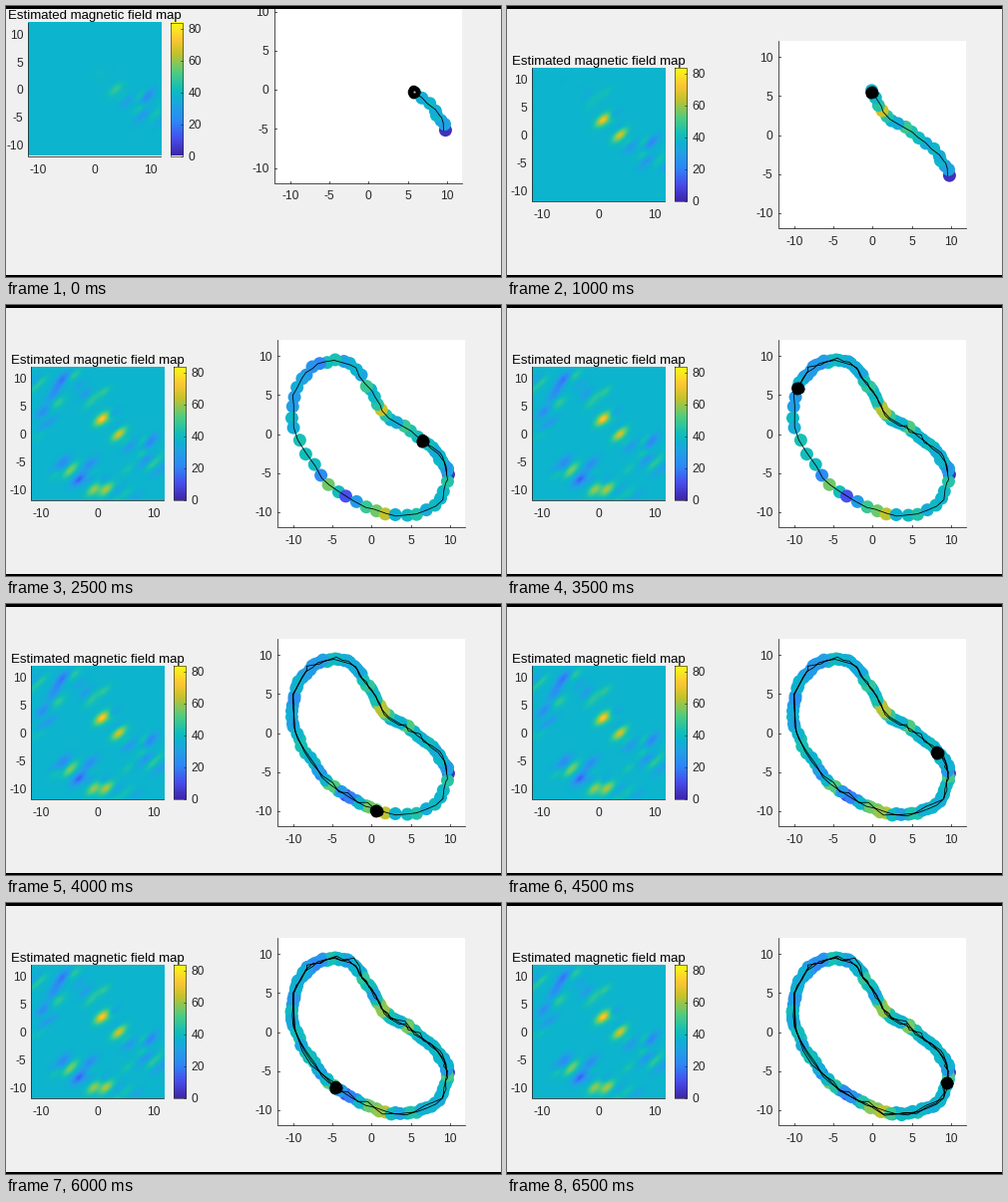
A matplotlib script for the animation above (9000 ms loop, 496x272 px).

```python
import numpy as np
import matplotlib.pyplot as plt
from matplotlib.animation import FuncAnimation
from matplotlib.colors import LinearSegmentedColormap
from matplotlib.patches import Rectangle

W, H, DPI = 496, 272, 100
PX = 72 / DPI
INK = "#262626"
VMAX, BASE = 83.75, 37.5
LAST = 12
rng = np.random.default_rng(4)
plt.rcParams["font.family"] = "Liberation Sans"

parula = LinearSegmentedColormap.from_list("parula", [
    (0, "#3e26a8"), (.125, "#484dec"), (.25, "#2e87f7"), (.375, "#1fa3e2"),
    (.44, "#0db3d0"), (.5, "#12beb9"), (.625, "#4fcc80"), (.77, "#c7c22b"),
    (.875, "#fec733"), (1, "#f9fb14")])

# Key points of one lap, in metres, with DOTS measurements between neighbours
KEYS = np.array([
    (9.7, -5.2), (8.4, -2.6), (5, .4), (1.8, 2.4), (-.1, 5.5), (-2.7, 8.9),
    (-6.7, 9), (-9.5, 6), (-9.9, .7), (-6.3, -5.4), (-2, -8.6),
    (3, -10.5), (8.1, -9.1)])
DOTS = 4
LAP = DOTS * len(KEYS)

# Strongest field blobs: x, y, height
PEAKS = [
    (-.5, 6.4, 11), (.7, 2.7, 33), (3.8, -.1, 29), (5.8, -2, -15),
    (9.5, -1.2, -15), (8.6, -5.3, -14), (10.6, -4.3, 11), (-6.3, 9.9, -20),
    (-8, 7, -11), (-9.9, 4, -13), (-7.2, 5.6, 10), (-6.1, -5.6, -12),
    (-4.8, -6.3, 16), (-3.4, -8.3, -23), (-1.4, -5.5, -13),
    (-.7, -10.1, 22), (1.5, -10.1, 24)]


def reach(step):
    """Measurements made by a given update; the pace varies along the lap."""
    return np.interp(step, [0, 1, 4, 6, 8, 10, 12],
                     [7.1, 16, 58.3, 80.1, 108.2, 128.7, 154.7])


def track(p):
    """Closed Catmull-Rom curve through the key points."""
    u = np.atleast_1d(p) / DOTS
    k, t = np.floor(u).astype(int), (u % 1)[:, None]
    a, b, c, d = (KEYS[(k + i) % len(KEYS)] for i in (-1, 0, 1, 2))
    return b + t / 2 * (c - a + t * (2 * a - 5 * b + 4 * c - d
                                     + t * (3 * (b - c) + d - a)))


def to_px(pts):
    return np.array([366.3, 129.5]) + pts * [7.85, -7.85]


def blob(x, y, height, long=1.6, short=.8, tilt=42):
    c, s = np.cos(np.radians(tilt)), np.sin(np.radians(tilt))

    def at(px, py):
        u = (px - x) * c + (py - y) * s
        v = (py - y) * c - (px - x) * s
        return height * np.exp(-(u / long) ** 2 - (v / short) ** 2)
    return at


# Weak ripples of alternating sign follow the track
ripples = [(*(xy + rng.normal(0, 1.6, 2)), (-1) ** i * rng.uniform(3, 9))
           for i, xy in enumerate(track(np.arange(0, LAP, 1.2)))]
spots = PEAKS + ripples
blobs = [blob(*s) for s in PEAKS] + [blob(*s, 1.4, .6) for s in ripples]
gx, gy = np.meshgrid(np.linspace(-12, 12, 134), np.linspace(12, -12, 134))
layers = np.array([b(gx, gy) for b in blobs])
lap = track(np.arange(LAP))
born = np.array([np.argmin(np.hypot(*(lap - s[:2]).T)) for s in spots])


def field(step):
    """Each blob fades in as the walker passes it."""
    gain = 1 / (1 + np.exp((born - reach(step) - 1) / 1.5))
    return BASE + np.tensordot(gain, layers, 1)


# Dots take the field strength where they lie; the first has no reading yet
dot_at = np.concatenate([np.arange(LAP), np.arange(LAP + .5, reach(LAST))])
dot_xy = track(dot_at) + rng.normal(0, .1, (len(dot_at), 2))
tone = BASE + sum(b(*dot_xy.T) for b in blobs) + rng.normal(1, 3, len(dot_at))
tone[0] = 3
dots, dot_rgb = to_px(dot_xy), parula(tone / VMAX)

path_at = np.arange(0, reach(LAST))
drift = rng.normal(0, 1, (len(path_at), 2))
drift *= np.where(path_at < LAP, .12, .22)[:, None]
path = to_px(track(path_at) + drift)
swarm = rng.normal(0, 1, (18, 2))

fig = plt.figure(figsize=(W / DPI, H / DPI), dpi=DPI, facecolor="#f0f0f0")
ax = fig.add_axes([0, 0, 1, 1])
ax.axis("off")


def label(x, y, s, ha="center", size=12, color=INK):
    ax.text(x, y, s, ha=ha, va="center_baseline", fontsize=size * PX, color=color)


def line(x, y, width=.8):
    ax.plot(x, y, color=INK, lw=width * PX, zorder=4)


# Field map and colour bar
image = ax.imshow(field(0), cmap=parula, vmin=0, vmax=VMAX, aspect="auto",
                  extent=(24.5, 158, 196, 62), interpolation="bilinear")
ax.imshow(np.linspace(1, 0, 256)[:, None], cmap=parula, aspect="auto",
          extent=(167.5, 180, 196, 62))
line([24.5, 24.5, 158], [62, 196, 196])
line([167.5, 180, 180, 167.5, 167.5], [62, 62, 196, 196, 62], .6)
label(91.5, 54, "Estimated magnetic field map", size=13.2, color="black")
for v in (-10, 0, 10):
    label(91.5 + 5.6 * v, 208.5, str(v))
for v in (-10, -5, 0, 5, 10):
    label(20.5, 129.5 - 5.56 * v, str(v), "right")
for v in range(0, 81, 20):
    label(185.5, 196 - 1.6 * v, str(v), "left")
    line([178, 180], [196 - 1.6 * v] * 2, .6)

# Track plot
ax.add_patch(Rectangle((272, 35), 188, 188, fc="white", lw=0))
line([272, 272, 460], [35, 223, 223])
for v in (-10, -5, 0, 5, 10):
    x, y = to_px(np.array([v, v]))
    label(x, 235.5, str(v))
    label(266.5, y, str(v), "right")
    line([x, x], [223, 221])
    line([272, 274], [y, y])

scat = ax.scatter([], [], s=(13 * PX) ** 2, linewidths=0, zorder=5)
trail, = ax.plot([], [], color="black", lw=.8 * PX, zorder=6)
core, = ax.plot([], [], "o", color="black", ms=10 * PX, mew=0, zorder=7)
rings, = ax.plot([], [], "o", mfc="none", mec="black", ms=8.5 * PX,
                 mew=1.1 * PX, zorder=8)
speck, = ax.plot([], [], "*", color="#c8c8c8", ms=3.5 * PX, mew=0, zorder=9)

for y, h in ((0, 2), (H - 3, 3)):
    fig.add_artist(Rectangle((0, y / H), 1, h / H, fc="black", lw=0))


def draw(frame):
    # The first view holds for two frames, the last one to the end
    step = min(max(frame - 1, 0), LAST)
    p = reach(step)
    # The first view is scrolled
    dx, dy = (3, 45.5) if step == 0 else (0, 0)
    ax.set_xlim(dx, W + dx)
    ax.set_ylim(H + dy, dy)
    image.set_data(field(step))

    here = to_px(track(p))
    n = np.searchsorted(dot_at, p, side="right")
    scat.set_offsets(dots[:n])
    scat.set_facecolors(dot_rgb[:n])
    trail.set_data(*np.vstack([path[path_at < p], here]).T)
    core.set_data(*here.T)
    rings.set_data(*(here + swarm).T)
    speck.set_data(*here.T)
    speck.set_visible(step == 0)
    return image, scat, trail, core, rings, speck


anim = FuncAnimation(fig, draw, frames=18, interval=500, repeat=True,
                     repeat_delay=0, blit=False)
plt.show()
```
